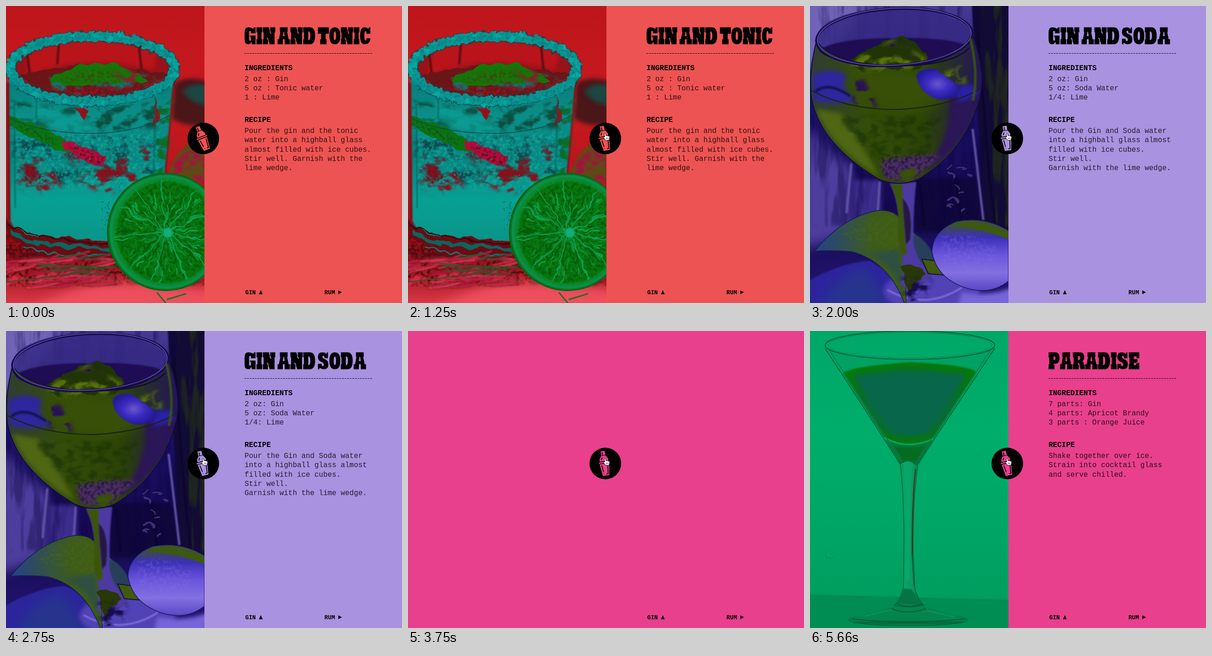
These frames come from a looping animation (864x648 px, 6.07 s). An HTML page:

```html
<!DOCTYPE html>
<html lang="en">
<head>
<meta charset="utf-8">
<title>Cocktail shaker</title>
<style>
html, body { margin: 0; width: 100%; height: 100%; overflow: hidden; }
svg { display: block; width: 864px; height: 648px; }
text { font-family: "Liberation Mono", "Courier New", monospace; font-size: 15.9px; white-space: pre; }
.bold { font-weight: 700; }
.body { fill-opacity: .8; }
.nav { font-size: 12.8px; font-weight: 700; }
</style>
</head>
<body>
<svg id="stage" viewBox="0 0 864 648"></svg>
<script>
const LOOP = 6070, STEP = 250, LAST = 21;
const TILT = [-22, -22, -22, -22, -22, -12, -12, -22, -8, -20, -10,
  -14, -12, -8, -24, -8, -20, -12, -22, -9, -20, -12];

// --- helpers -------------------------------------------------------
let seed = 7;
const rnd = (a = 0, b = 1) => {
  seed = (seed * 16807) % 2147483647;
  return a + (b - a) * seed / 2147483647;
};
const pick = list => list[Math.floor(rnd(0, list.length))];
const many = (n, make) => Array.from({ length: n }, (_, i) => make(i)).join('');
const path = (d, fill, more = '') => `<path d="${d}" fill="${fill}" ${more}/>`;
const line = (d, color, w = 2, more = '') =>
  `<path d="${d}" fill="none" stroke="${color}" stroke-width="${w}" stroke-linecap="round" ${more}/>`;
const oval = (x, y, rx, ry, fill, more = '') =>
  `<ellipse cx="${x}" cy="${y}" rx="${rx}" ry="${ry}" fill="${fill}" ${more}/>`;
const box = (x, y, w, h, fill, more = '') =>
  `<rect x="${x}" y="${y}" width="${w}" height="${h}" fill="${fill}" ${more}/>`;
const use = id => `filter="url(#${id})"`;
const group = (id, s) => `<g ${use(id)}>${s}</g>`;
const stops = list => list.map((c, i) =>
  `<stop offset="${i / (list.length - 1)}" stop-color="${c}"/>`).join('');
const down = (id, ...c) => `<linearGradient id="${id}" x2="0" y2="1">${stops(c)}</linearGradient>`;
const across = (id, ...c) => `<linearGradient id="${id}">${stops(c)}</linearGradient>`;
const glow = (id, ...c) => `<radialGradient id="${id}">${stops(c)}</radialGradient>`;
const area = 'filterUnits="userSpaceOnUse" x="-60" y="-60" width="560" height="770" color-interpolation-filters="sRGB"';
const blur = (id, s) => `<filter id="${id}" ${area}><feGaussianBlur stdDeviation="${s}"/></filter>`;
const rough = (id, freq, scale, s) => `<filter id="${id}" ${area}>
  <feTurbulence type="fractalNoise" baseFrequency="${freq}" numOctaves="2" seed="4"/>
  <feDisplacementMap in="SourceGraphic" scale="${scale}" xChannelSelector="R" yChannelSelector="G"/>
  <feGaussianBlur stdDeviation="${s}"/></filter>`;
// keeps a shape only where noise is high, with soft borders
const mottle = (id, freq, cut, gain) => `<filter id="${id}" ${area}>
  <feGaussianBlur stdDeviation="4" result="s"/>
  <feTurbulence type="fractalNoise" baseFrequency="${freq}" numOctaves="3" seed="9"/>
  <feColorMatrix values="0 0 0 0 0 0 0 0 0 0 0 0 0 0 0 ${gain} 0 0 0 ${-gain * cut}" result="n"/>
  <feComposite in="s" in2="n" operator="in"/></filter>`;

const defs = `<defs>
  <clipPath id="photo"><rect width="433" height="648"/></clipPath>
  ${blur('soft', 1.5)}${blur('mist', 5)}${blur('haze', 12)}
  ${rough('salt', .1, 15, .6)}${rough('wavy', .04, 18, .7)}
  ${mottle('patch', '.03 .045', .45, 5)}${mottle('grain', .14, .44, 4)}${mottle('streak', '.05 .008', .48, 5)}
  ${down('redWall', '#bd151b', '#c71a20', '#b31419', '#98090f')}
  ${down('cloth', '#86090f', '#a3121c', '#e44250')}
  ${down('tonic', '#087a78', '#0a8f88', '#07857f', '#08a094', '#0a9488')}
  ${glow('pulp', '#0a8d2c', '#077a12', '#06760c')}
  ${down('wood', '#463a94', '#1c0f68', '#150a50', '#241472')}
  ${across('bowl', '#303d32', '#344d08', '#2c4206', '#22145a')}
  ${glow('berry', '#6a58cc', '#3c2cc0', '#241a9a')}
  ${down('stone', '#3d5a14', '#3b2fb8', '#6a55dc', '#8370e2', '#5a47c4')}
  ${across('leaf', '#23418a', '#3d5c1c', '#425e0a')}
  ${down('mint', '#00a768', '#00ad6b', '#00a565', '#009a5c')}
  ${glow('juice', '#086b50', '#08694a', '#076c2c', '#05780a')}
  ${across('stem', '#067545', '#07a367', '#0a9660', '#056a3c')}
</defs>`;

// --- pictures ------------------------------------------------------
function tonicPhoto() {
  const cx = 350, cy = 493;
  const ray = (a, r1, r2, color, w, bend = 0) => line(
    `M${cx + r1 * Math.cos(a)} ${cy + r1 * Math.sin(a)}L${cx + r2 * Math.cos(a + bend)} ${cy + r2 * Math.sin(a + bend)}`, color, w);
  return box(0, 0, 433, 648, 'url(#redWall)')
    + path('M368 168Q400 150 445 166V260Q390 265 362 245Z', '#4a1618', use('mist'))
    + path('M385 185Q410 162 445 176V215Q405 218 385 185Z', '#1b4642', use('mist'))
    + path('M355 365Q372 300 433 288V385Z', '#5f4a16', use('soft'))
    + path('M355 365Q380 310 440 296V385Z', '#a80f42', use('patch'))
    + box(-20, 470, 480, 200, 'url(#cloth)')
    + box(-20, 535, 480, 75, '#560b12', use('patch'))
    + box(-20, 500, 300, 110, '#4a0b11', use('grain'))
    + path('M40 670Q170 590 290 604L460 620V670Z', '#ee4f5c', use('haze'))
    + path('M-10 560Q60 540 250 555L230 600Q90 610 -10 620Z', '#d32a42', use('patch'))
    + path('M6 150L6 470Q20 495 62 508L300 515L346 365Q360 260 365 150Z', 'url(#tonic)')
    + path('M8 205Q180 240 355 200L352 262Q180 290 8 250Z', '#0c4f40', use('patch'))
    + path('M12 285H348L342 370Q180 400 16 380Z', '#0b4c50', use('patch'))
    + path('M16 275H345L335 385Q180 415 20 390Z', '#18b5a8', use('grain') + ' opacity=".5"')
    + path('M22 330L75 325L125 395L60 415L22 390ZM150 375L280 325L310 385L215 415ZM265 300L320 310L310 350Z', '#86101c', use('patch'))
    + path('M30 345L70 350L100 390L40 390ZM120 300L150 300L165 350L130 345Z', '#6a1220', use('grain'))
    + path('M5 238Q70 255 130 292L150 325Q80 300 5 262Z', '#0c7410', use('wavy'))
    + path('M5 250Q60 262 120 300L100 302Q50 275 5 262Z', '#0b4d24', use('grain'))
    + path('M122 295L150 298L216 328L210 350L174 340L126 310Z', '#b20d3c', use('wavy'))
    + path('M135 300L215 328L206 352L150 325Z', '#5d1020', use('grain'))
    + path('M60 205L66 250Q120 278 190 274V240Q110 240 60 205Z', '#0ba097', use('mist') + ' opacity=".7"')
    + path('M150 222L180 226L170 250ZM325 195L333 245L322 260Z', '#96101c', use('wavy'))
    + path('M335 215L364 195L350 365L325 372Z', '#0c6f20', use('patch'))
    + line('M10 246Q80 278 190 278Q290 276 358 238', '#0a4a4c', 1.5)
    + line('M66 200V245M18 215L20 440M327 205L322 365', '#0a5750', 2, use('soft'))
    + line('M4 170L7 470Q18 500 62 508', '#7d111a', 6, use('soft'))
    + line('M366 165L348 362', '#7d111a', 3, use('soft'))
    + many(70, () => oval(rnd(25, 335), rnd(285, 400), rnd(.6, 2.2), rnd(.6, 2.2),
        pick(['#1bb9ac', '#0b5558', '#0b7068']), 'opacity=".75"'))
    + many(26, () => oval(rnd(208, 226), rnd(425, 490), 1, 1, '#0a5550'))
    // thick glass base
    + group('wavy', path('M0 462Q22 498 70 504Q150 500 240 520V548Q130 556 66 540Q12 515 0 490Z', '#6c0b12')
      + line('M14 492Q50 522 110 522T235 534', '#0a6660', 8)
      + line('M40 526Q100 545 225 544', '#0b7a72', 3)
      + line('M8 478Q60 512 230 518', '#2b0c10', 3))
    // mouth of the glass
    + oval(189, 137, 181, 72, '#98121a')
    + path('M50 98Q190 50 330 100L322 140Q180 100 45 152Z', '#ba141b', use('mist'))
    + line('M45 95L52 148M115 85L112 125M290 85L296 142', '#5c0d12', 5, use('soft'))
    + path('M30 155Q110 125 180 130Q290 130 352 150Q290 198 180 202Q80 202 30 155Z', '#6b1518', use('wavy'))
    + path('M55 165Q180 125 335 158Q250 200 160 198Z', '#0d7770', use('patch'))
    + path('M60 170Q180 185 330 165Q250 200 160 198Z', '#9a1220', use('grain'))
    + path('M95 160Q140 128 204 124Q270 126 309 168Q240 160 180 172Q130 180 95 160Z', '#157508', use('wavy'))
    + path('M110 165Q150 140 210 140Q250 150 280 165Q180 170 110 165Z', '#3c4a10', use('grain'))
    + path('M225 140L275 132L308 172L260 165Z', '#861e2c', use('patch'))
    + oval(189, 137, 179, 71, 'none', `stroke="#0a4148" stroke-width="24" ${use('salt')} opacity=".7"`)
    + oval(189, 137, 179, 71, 'none', `stroke="#0a9793" stroke-width="20" ${use('salt')}`)
    + oval(189, 137, 179, 71, 'none', `stroke="#067478" stroke-width="14" ${use('grain')} opacity=".8"`)
    + group('salt', many(70, i => {
        const a = i * Math.PI / 35;
        return oval(189 + 183 * Math.cos(a) + rnd(-6, 6), 138 + 74 * Math.sin(a) + rnd(-5, 5),
          rnd(3, 7), rnd(3, 6), pick(['#079b98', '#0aa7a0', '#08888a']));
      }))
    // rosemary
    + group('soft', many(44, i => {
        const x = rnd(-30, 190), y = rnd(552, 618);
        const d = `M${x} ${y}q${rnd(20, 40)} ${rnd(-6, 0)} ${rnd(45, 75)} ${rnd(-22, 4)}`;
        return line(d, '#6a0c18', 5) + line(d, pick(['#d52750', '#c21a42', '#d83552', '#e84b60']), 3);
      }))
    + many(12, () => line(`M${rnd(60, 170)} ${rnd(545, 590)}q30 -2 ${rnd(45, 70)} ${rnd(-10, 8)}`, '#17602a', 1.6))
    + line('M0 602Q120 590 250 565M75 565L240 570M160 550L230 540', '#1b5a28', 2)
    + line('M330 626l22 26M352 640l40 -12', '#177128', 3)
    // lime
    + oval(cx - 2, cy, 128, 129, '#07660e')
    + oval(cx - 1, cy, 124, 125, '#0b9050', use('soft'))
    + oval(cx, cy, 118, 119, '#0a8a30', use('soft'))
    + oval(cx + 1, cy + 1, 110, 111, 'url(#pulp)', use('soft'))
    + oval(cx, cy, 108, 109, '#045a0a', use('grain'))
    + group('wavy', many(190, () => {
        const a = rnd(0, 6.28), r = rnd(22, 88);
        return ray(a, r, r + rnd(10, 26), pick(['#0c9c48', '#045c09', '#07690d', '#0a8a2c']), rnd(1.5, 4), rnd(-.05, .05));
      })
      + many(11, i => ray(i * 6.283 / 11 + rnd(0, .25), 4, 112, '#0ea058', 2.2)))
    + oval(353, 495, 10, 11, '#12ad78', use('soft'));
}

function sodaPhoto() {
  const bowl = 'M14 76Q-4 150 3 200Q20 300 150 378Q195 396 236 378Q342 318 372 195Q384 140 353 58Q330 130 184 130Q50 128 14 76Z';
  return box(0, 0, 433, 648, 'url(#wood)')
    + path('M-20 -20H130L50 120L-20 150Z', '#7063b8', use('haze'))
    + path('M-20 250Q50 330 90 350V500L-20 530Z', '#4d3d9c', use('haze'))
    + box(95, 380, 60, 120, '#3c2c8c', use('mist'))
    + box(228, 375, 205, 120, '#10073c', use('mist'))
    + path('M352 -20H450V500H380Z', '#110b35', use('soft'))
    + path('M375 -20H450V480H396Z', '#2c3b0b', use('streak'))
    + box(0, 0, 433, 480, '#0b0440', use('streak') + ' opacity=".4"')
    + line('M355 270L378 465M90 345L80 450M152 385L148 445', '#6254a8', 5, use('soft'))
    + line('M366 60L392 380L404 480M240 390L250 480M318 375L330 470', '#0a0428', 3, use('soft'))
    + group('wavy', many(12, () => line(`M${rnd(290, 345)} ${rnd(345, 460)}l${rnd(4, 14)} ${rnd(-8, 8)}`, '#432f74', 4)))
    + path('M-20 610Q60 560 130 556L210 600V670H-20Z', '#2c249c', use('soft'))
    + path('M20 670Q50 590 120 570L190 670Z', '#27348e', use('haze'))
    + oval(265, 622, 105, 46, '#5142b6', use('mist'))
    + line('M170 620Q250 665 330 615', '#8a7be0', 3, use('soft'))
    // leaf
    + path('M10 535Q70 460 150 446Q190 444 202 474Q250 510 266 548Q230 545 200 530Q208 580 210 648H206Q170 555 90 536Q45 532 10 535Z', 'url(#leaf)', 'stroke="#16204c" stroke-width="1.5"')
    + path('M120 540Q190 560 210 650L195 530Z', '#2f5040', use('mist'))
    + path('M60 505Q130 450 190 462L196 540Q130 510 60 505Z', '#4f6b12', use('grain') + ' opacity=".4"')
    + path('M215 495Q250 500 270 545L292 586Q240 585 215 540Z', '#273f5a', use('soft'))
    // stem
    + path('M174 386L232 384Q224 450 226 520Q235 560 268 590L232 620L198 610Q208 560 194 520Q200 440 174 386Z', '#4c3aa2', use('soft'))
    + path('M176 390H202Q200 460 212 540L200 544Q190 520 193 480Q194 420 176 390Z', '#3c5608', use('soft'))
    + path('M202 420Q226 440 218 510L210 520Q205 470 202 420Z', '#24183e', use('soft'))
    + path('M198 570Q225 550 250 582L216 622Z', '#293806', use('wavy'))
    + path('M244 552L274 556L294 587L258 584Z', '#415a0d', 'stroke="#141238" stroke-width="2"')
    + path('M200 592L270 590L246 648H206Z', '#170c4c', use('patch'))
    // bowl
    + oval(184, 68, 169, 63, '#372a84', 'opacity=".85"')
    + path('M22 95Q60 70 184 70Q310 68 346 88Q320 130 184 130Q55 130 22 95Z', '#1e0d52', use('soft'))
    + path(bowl, 'url(#bowl)')
    + path('M300 180Q376 180 368 195Q340 310 250 362Q320 270 300 180Z', '#2b1658', use('mist'))
    + path('M14 225Q40 305 150 370Q110 300 70 235Z', '#4f6613', use('mist'))
    + path('M80 140H260L300 200L220 240L110 210Z', '#374f07', use('haze'))
    + path('M60 240H310L250 330H130Z', '#193204', use('patch') + ' opacity=".6"')
    + path('M155 340Q210 325 285 325L232 374Q190 384 162 374Z', '#4b2d62', use('mist'))
    + path('M150 330Q210 320 285 325L232 374Q190 384 162 374Z', '#1d0e40', use('grain') + ' opacity=".7"')
    + path('M190 360L240 350L220 385L170 388Z', '#395308', use('patch'))
    + path('M5 150Q50 130 80 152Q60 180 100 205Q60 220 8 205Z', '#2d269e', use('mist'))
    + line('M14 185Q40 165 85 195', '#121650', 6, use('soft'))
    + path('M90 165L118 160L148 220L95 212Z', '#281254', use('patch'))
    + path('M89 115L144 85L194 68L224 76L260 112L234 140L114 142Z', '#203405', use('wavy'))
    + path('M90 120L180 72L255 115L220 138L95 142Z', '#587309', use('patch'))
    + path('M150 92L195 74L235 115L180 108Z', '#170834', use('patch'))
    + path('M280 150L332 130L342 170L300 175Z', '#536d0d', use('patch'))
    + path('M326 175Q362 165 368 190Q350 206 318 208Z', '#2a20a8', use('mist'))
    + path('M232 150Q245 132 275 138L326 175Q328 205 280 204Q236 190 232 150Z', 'url(#berry)', use('soft'))
    + line('M4 185Q80 225 184 226Q300 222 372 180', '#17260d', 2.5)
    + line('M22 98Q60 130 184 131Q310 130 346 93', '#140a3a', 3)
    + line(bowl, '#120a3c', 2)
    + `<g transform="rotate(-3 184 68)">${oval(184, 68, 170, 62, 'none', 'stroke="#170b4e" stroke-width="6"')
      + oval(184, 67, 168, 62, 'none', 'stroke="#6858ac" stroke-width="1.5"')}</g>`
    + line('M350 72Q368 145 356 205', '#3c5510', 5, use('soft'))
    // stone
    + path('M266 535Q268 490 320 470Q380 458 433 490V600Q400 628 350 618Q276 598 266 535Z', 'url(#stone)', 'stroke="#18125c" stroke-width="1.5"')
    + path('M305 480Q360 462 440 494V512Q370 482 305 480Z', '#3d5a0c', use('soft'))
    + path('M280 505Q350 480 410 530L390 585L290 570Z', '#8878d8', use('grain') + ' opacity=".25"')
    + path('M330 625Q400 635 450 610V670H320Z', '#7565d8', use('mist'));
}

function paradisePhoto() {
  const dark = '#055f36';
  return box(0, 0, 433, 648, 'url(#mint)')
    + path('M0 576L433 588V648H0Z', '#008d54')
    + line('M0 576L433 588', '#007f4a', 1.5, use('soft'))
    + line('M36 480q-6 10 4 15q8 4 11 -3', '#009159', 1.5)
    + path('M33 38L196 288H234L403 38Q340 64 218 64Q90 64 33 38Z', '#009d60', 'opacity=".55"')
    + path('M72 92Q85 78 218 68Q350 74 363 90L270 234Q245 246 215 246Q185 246 163 234Z', 'url(#juice)', use('soft'))
    + path('M92 96Q218 82 343 94L258 222Q215 234 176 222Z', '#08674a', use('mist'))
    + path('M163 236Q215 260 270 236L236 292Q220 282 198 293Z', '#047539', use('soft'))
    + path('M185 252Q215 258 248 252L232 284H204Z', '#046c1e', use('soft'))
    + line('M163 233Q190 248 218 248Q250 246 268 235', '#0aa35e', 3)
    + line('M33 38L198 292M403 38L234 292', dark, 1.5)
    + line('M42 42L196 277M394 42L238 276', '#087e49', 1.5)
    + oval(218, 31, 185, 31, 'none', `stroke="${dark}" stroke-width="2"`)
    + oval(218, 31, 179, 28, 'none', 'stroke="#07824c" stroke-width="1"')
    // stem and foot
    + oval(214, 630, 129, 13, '#058049', `stroke="${dark}" stroke-width="1.5"`)
    + path('M86 627Q150 612 184 598H246Q285 614 341 627Q290 640 214 640Q135 640 86 627Z', '#04854e')
    + path('M197 290Q216 276 235 294Q224 370 225 480L229 562Q234 584 248 598Q216 606 184 598Q202 582 204 555L205 440Q204 350 197 290Z', 'url(#stem)', `stroke="${dark}" stroke-width="1.5"`)
    + path('M204 290Q214 276 224 292Q216 400 218 540L208 545Q214 400 204 290Z', '#0aa96d', 'opacity=".65"')
    + line('M230 302Q222 380 223 490', '#4d2c16', 2.2)
    + line('M223 490L227 556', '#07592e', 2)
    + path('M204 562L222 564L244 594Q215 602 190 594Z', '#057344', use('soft'))
    + line('M190 595Q215 606 244 595M178 606Q214 620 252 606M92 628Q214 642 336 628', '#045c35', 2)
    + line('M120 622Q160 612 180 608M255 610Q290 618 315 624', '#0b9b62', 1.5)
    + oval(214, 636, 120, 4, '#056238', use('soft') + ' opacity=".7"');
}

// --- lettering: [advance, outline] in a 38 px high box ---------------
const GLYPH = {
  G: [26, 'M8 0Q0 0 0 12V27Q0 38 8 38Q14 38 15 33L16 38H25V18H12V22H14V28Q12.5 31 11 28V10Q12.5 7 14 10V14H25V0H21L19 3Q15 0 8 0Z'],
  I: [14, 'M0 0H13.5V12H12V26H13.5V38H0V26H2V12H0Z'],
  N: [28, 'M0 0H14L18 15V12H16V0H28V12H26.5V38H15L10 23V26H12V38H0V26H1.5V12H0Z'],
  A: [28, 'M5 0H23V11H22L25 26H28V38H15.5V27H12.5V38H0V26H3L6 11H5ZM12.5 19H15.5L14 10Z'],
  D: [28, 'M0 0H16Q27 1 27 19Q27 37 16 38H0V26H1.5V12H0ZM12 10V28Q15.5 28 15.5 19Q15.5 10 12 10Z'],
  T: [25, 'M0 0H25V15H18V26H20V38H5V26H7V15H0Z'],
  O: [25, 'M12.5 0Q25 0 25 19Q25 38 12.5 38Q0 38 0 19Q0 0 12.5 0ZM12.5 10Q10.5 11 10.5 19Q10.5 27 12.5 28Q14.5 27 14.5 19Q14.5 11 12.5 10Z'],
  C: [24, 'M10 0Q0 0 0 19Q0 38 10 38Q23.5 38 23.5 24H14Q14 29 12 29Q10.5 28 10.5 19Q10.5 9 12 9Q14 9 14 15H23.5V0H20L18 3Q15 0 10 0Z'],
  S: [25, 'M10 0Q0 0 0 11Q0 19 8 22Q13 24 13 27Q13 30 11 30Q9 30 9 25H0V38H4L5 35Q8 38 13 38Q24 38 24 27Q24 18 16 15Q11 13 11 11Q11 8 12 8Q14 8 15 14H23V0H20L19 3Q16 0 10 0Z'],
  P: [25, 'M0 0H15Q25 0 25 13Q25 26 15 26H12V27H14V38H0V26H1.5V12H0ZM12 10V17Q15 17 15 13.5Q15 10 12 10Z'],
  R: [27, 'M0 0H16Q26 0 26 11Q26 17 22 20Q25 22 25 27H27V38H19Q15 37 15 30Q15 24 12 24V27H14V38H0V26H1.5V12H0ZM12 9V17Q16 17 16 13Q16 9 12 9Z'],
  E: [24, 'M0 0H24V14H17V10H12V15H20V24H12V28H16V23H24V38H0V26H1.5V12H0Z'],
  ' ': [4, '']
};
function lettering(words, bg) {
  let x = 520;
  return `<g role="img" aria-label="${words}" fill-rule="evenodd" stroke="${bg}" stroke-width="1.1">`
    + [...words].map(ch => {
      const [w, d] = GLYPH[ch], at = x;
      x += w;
      return d && path(d, '#000', `transform="translate(${at} 46)"`);
    }).join('') + '</g>';
}

// --- pages -----------------------------------------------------------
const text = (x, y, cls, s) => `<text x="${x}" y="${y}" class="${cls}">${s}</text>`;
const rows = (y, gap, list) => list.map((s, i) => text(520.5, y + i * gap, 'body', s)).join('');

const PAGES = [
  { bg: '#ed5352', photo: tonicPhoto, title: 'GIN AND TONIC',
    parts: ['2 oz : Gin', '5 oz : Tonic water', '1 : Lime'],
    recipe: ['Pour the gin and the tonic', 'water into a highball glass',
      'almost filled with ice cubes.', 'Stir well. Garnish with the', 'lime wedge.'] },
  { bg: '#a992e0', photo: sodaPhoto, title: 'GIN AND SODA',
    parts: ['2 oz: Gin', '5 oz: Soda Water', '1/4: Lime'],
    recipe: ['Pour the Gin and Soda water', 'into a highball glass almost',
      'filled with ice cubes.', 'Stir well.', 'Garnish with the lime wedge.'] },
  { bg: '#e8408c', photo: paradisePhoto, title: 'PARADISE',
    parts: ['7 parts: Gin', '4 parts: Apricot Brandy', '3 parts : Orange Juice'],
    recipe: ['Shake together over ice.', 'Strain into cocktail glass', 'and serve chilled.'] }
];

const page = p => `<g class="page" display="none">
  <g clip-path="url(#photo)">${p.photo()}</g>
  ${lettering(p.title, p.bg)}
  <path d="M520.5 103.5H800" stroke="#000" stroke-width="1.2" stroke-dasharray="3.7 1.9"/>
  ${text(520.5, 140, 'bold', 'INGREDIENTS')}${rows(164, 20, p.parts)}
  ${text(520.5, 253, 'bold', 'RECIPE')}${rows(277, 20.25, p.recipe)}</g>`;

const shaker = `<g id="shaker">
  <path d="M-4.5 -27.5H4.5V-18H-4.5Z"/>
  <path d="M-5 -17H5L9.5 -10V-5H-9.5V-10Z"/>
  <path d="M-12 -3.5H12V-1H-12Z"/>
  <path d="M-10.5 .5H10.5L7 26.5H-7Z"/>
  <path d="M-1.5 -25V-18M-6 -8L-3.2 -13.5M-6.4 3L-4.4 18M-3.8 21.5V22.5M7.2 3L5 23H1" fill="none" stroke="#000" stroke-width="1.7"/></g>`;

const hand = `<g id="hand">
  <path d="M428.4 279.2Q430 276.4 431.4 279.2L432 283.4Q433.6 282 434.8 283.6Q436.4 282.4 437.4 284.2Q439.8 283.4 440 286.2Q440 290 438.2 293H431Q429 289.6 426.4 286.8Q426.4 284.4 429.2 286Z" fill="#fff" stroke="#000" stroke-width=".9"/>
  <path d="M432.6 287V290.5M434.8 287V290.5M437 287V290.5" stroke="#000" stroke-width=".7"/></g>`;

const stage = document.getElementById('stage');
stage.innerHTML = defs + '<rect id="bg" width="864" height="648"/>'
  + PAGES.map(page).join('')
  + text(522, 628.5, 'nav', 'GIN') + path('M552 629L556 620L560 629Z', '#000')
  + text(694.8, 628.5, 'nav', 'RUM') + path('M725 620.4L733 624.6L725 628.8Z', '#000')
  + '<circle cx="430.5" cy="289" r="34.5"/>' + shaker + hand;

const $ = id => document.getElementById(id);
const pages = [...stage.querySelectorAll('.page')];
const show = (el, on) => el.setAttribute('display', on ? 'inline' : 'none');

function draw(step) {
  const n = step < 6 ? 0 : step < 15 ? 1 : 2;
  const blank = [6, 7, 15, 16].includes(step);
  const { bg } = PAGES[n];
  $('bg').setAttribute('fill', bg);
  pages.forEach((p, i) => show(p, i === n && !blank));
  $('shaker').setAttribute('fill', bg);
  $('shaker').setAttribute('transform', `translate(428.5 289) rotate(${TILT[step]})`);
  show($('hand'), step > 3);
}

const start = performance.now();
let last = -1;
function tick() {
  const t = (performance.now() - start) % LOOP;
  const step = Math.min(LAST, Math.floor(t / STEP));
  if (step !== last) draw(step);
  last = step;
  requestAnimationFrame(tick);
}
tick();
</script>
</body>
</html>
```
